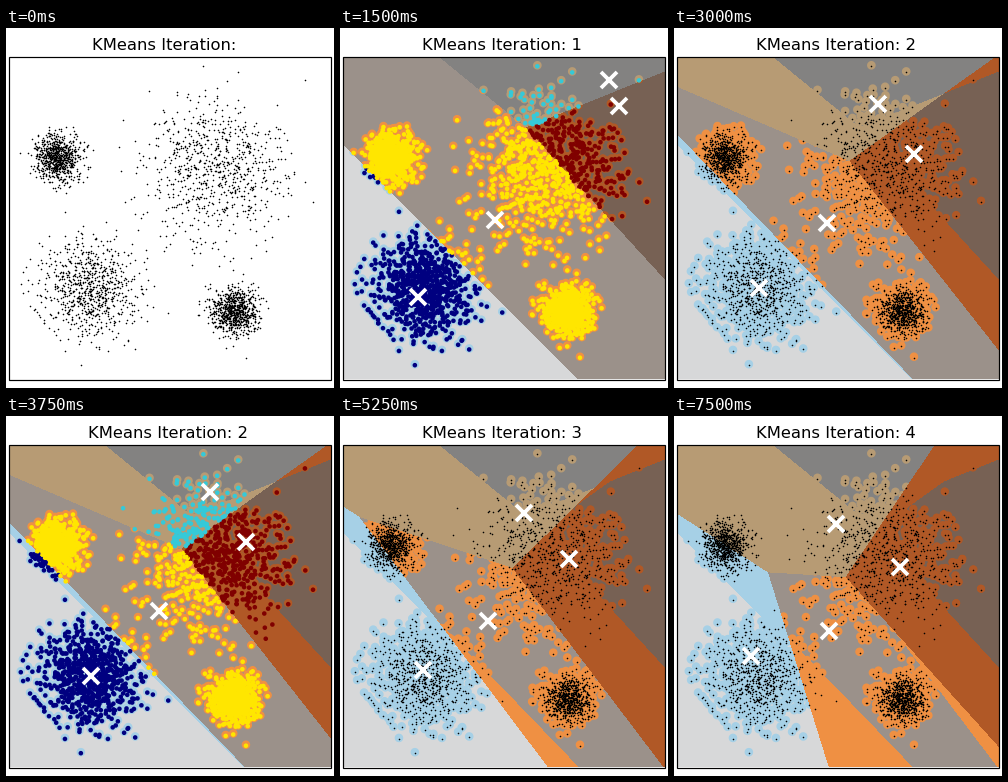
Write a matplotlib script that moves like this. It is 328x360 px and loops after 8000 ms.

```python
import numpy as np
import matplotlib.pyplot as plt
from matplotlib.animation import FuncAnimation
from matplotlib.patches import Rectangle

W, H, DPI = 328, 360, 64
PX = 72 / DPI                       # points per pixel
LEFT, TOP, RIGHT, BOTTOM = 2.5, 28.5, 324.5, 351.5

# region order: top, right, middle, left
GRAYS = np.array([[v] * 3 for v in (130, 100, 146, 217)], float)
TINTS = np.array([[183, 155, 116], [176, 88, 38], [239, 144, 67], [166, 208, 230]], float)
WASH = np.array([0.02, 0.25, 0.1, 0.02])
DOTS = np.array(["#35c9d8", "#800000", "#ffe600", "#000080"])

CENTERS = np.array([
    [[268.5, 52], [279, 78], [155, 191.5], [77.5, 269]],
    [[204, 75.5], [240, 126], [152.5, 195], [85, 260]],
    [[183.5, 97], [228.5, 143], [147.5, 204.5], [82.5, 253.5]],
    [[161.5, 107.5], [226, 151], [155, 215], [76.5, 239.5]],
])
BLOBS = [(51, 131, 11.5), (208, 143, 35), (84, 260, 24.5), (228, 283, 11.5)]
PER_BLOB = 770


def make_points():
    rng = np.random.default_rng(7)
    pts = np.vstack([rng.normal((x, y), s, (PER_BLOB, 2)) for x, y, s in BLOBS])
    low, high = (LEFT + 3, TOP + 9), (RIGHT - 3, BOTTOM - 3)
    return pts[np.all((pts > low) & (pts < high), axis=1)]


def nearest(xy, centers):
    return ((xy[..., None, :] - centers) ** 2).sum(-1).argmin(-1)


def halo_mask(pts, radius=4.3):
    mask = np.zeros((H, W))
    base = np.floor(pts).astype(int)
    for dy in range(-6, 7):
        for dx in range(-6, 7):
            cell = base + (dx, dy)
            dist = np.hypot(*(cell + 0.5 - pts).T)
            ok = (cell >= 0).all(1) & (cell < (W, H)).all(1)
            cover = np.clip(radius + 0.5 - dist, 0, 1)
            np.maximum.at(mask, (cell[ok, 1], cell[ok, 0]), cover[ok])
    return mask


points = make_points()
grid = np.stack(np.meshgrid(np.arange(W) + 0.5, np.arange(H) + 0.5), axis=-1)
regions = [nearest(grid, c) for c in CENTERS]
groups = [nearest(points, c) for c in CENTERS]
halo = halo_mask(points)


def background(k, phase):
    """Gray regions, tinted around the points and wherever the region changed."""
    label = regions[k]
    gray, tint = GRAYS[label], TINTS[label]
    if k == 0 and phase == 0:
        return gray.astype(np.uint8)
    mix = np.maximum(halo, WASH[label])
    for before, after in zip(regions[:k], regions[1:k + 1]):
        mix = np.where(before != after, 1, mix)
    return (gray + (tint - gray) * mix[..., None]).astype(np.uint8)


fig = plt.figure(figsize=(W / DPI, H / DPI), dpi=DPI, facecolor="white")
ax = fig.add_axes([0, 0, 1, 1])
ax.axis("off")

blank = np.full((H, W, 3), 255, np.uint8)
image = ax.imshow(blank, extent=(0, W, H, 0), interpolation="nearest", aspect="auto")
ax.set_xlim(0, W)
ax.set_ylim(H, 0)
box = Rectangle((LEFT, TOP), RIGHT - LEFT, BOTTOM - TOP, fill=False,
                ec="black", lw=1.2 * PX, zorder=6)
ax.add_patch(box)
image.set_clip_path(box)

small, = ax.plot(*points.T, "o", ms=1.6 * PX, mew=0, color="black", zorder=2)
large = ax.scatter(*points.T, s=(4.6 * PX) ** 2, lw=0, zorder=2)
large.set_clip_path(box)
paths = [ax.plot([], [], color="#9c9c98", lw=2.5 * PX, zorder=3)[0] for _ in range(4)]
crosses, = ax.plot([], [], "x", color="white", ms=15.5 * PX, mew=3.8 * PX, zorder=4)
title = ax.text(0, 22.5, "", fontsize=16.4 * PX, family="DejaVu Sans",
                ha="left", va="baseline", color="black")

STEPS = 11
scenes = [blank] + [background(*divmod(n, 3)) for n in range(STEPS - 1)]


def draw(frame):
    step = frame // 3
    k, phase = divmod(step - 1, 3)
    image.set_data(scenes[step])
    title.set_text(f"KMeans Iteration: {k + 1}" if step else "KMeans Iteration:")
    title.set_x(82.3 if step else 86.4)

    colored = step > 0 and phase > 0
    small.set_visible(not colored)
    large.set_visible(colored)
    if colored:
        large.set_facecolor(DOTS[groups[k]])

    moved = step > 0 and phase == 2
    shown = CENTERS[k:k + 1 + moved] if step else CENTERS[:0]
    crosses.set_data(shown[..., 0].ravel(), shown[..., 1].ravel())
    for i, path in enumerate(paths):
        path.set_visible(moved)
        if moved:
            path.set_data(*CENTERS[k:k + 2, i].T)
    return image, small, large, crosses, title, *paths


anim = FuncAnimation(fig, draw, frames=32, interval=250, repeat=True, repeat_delay=0)
plt.show()
```
